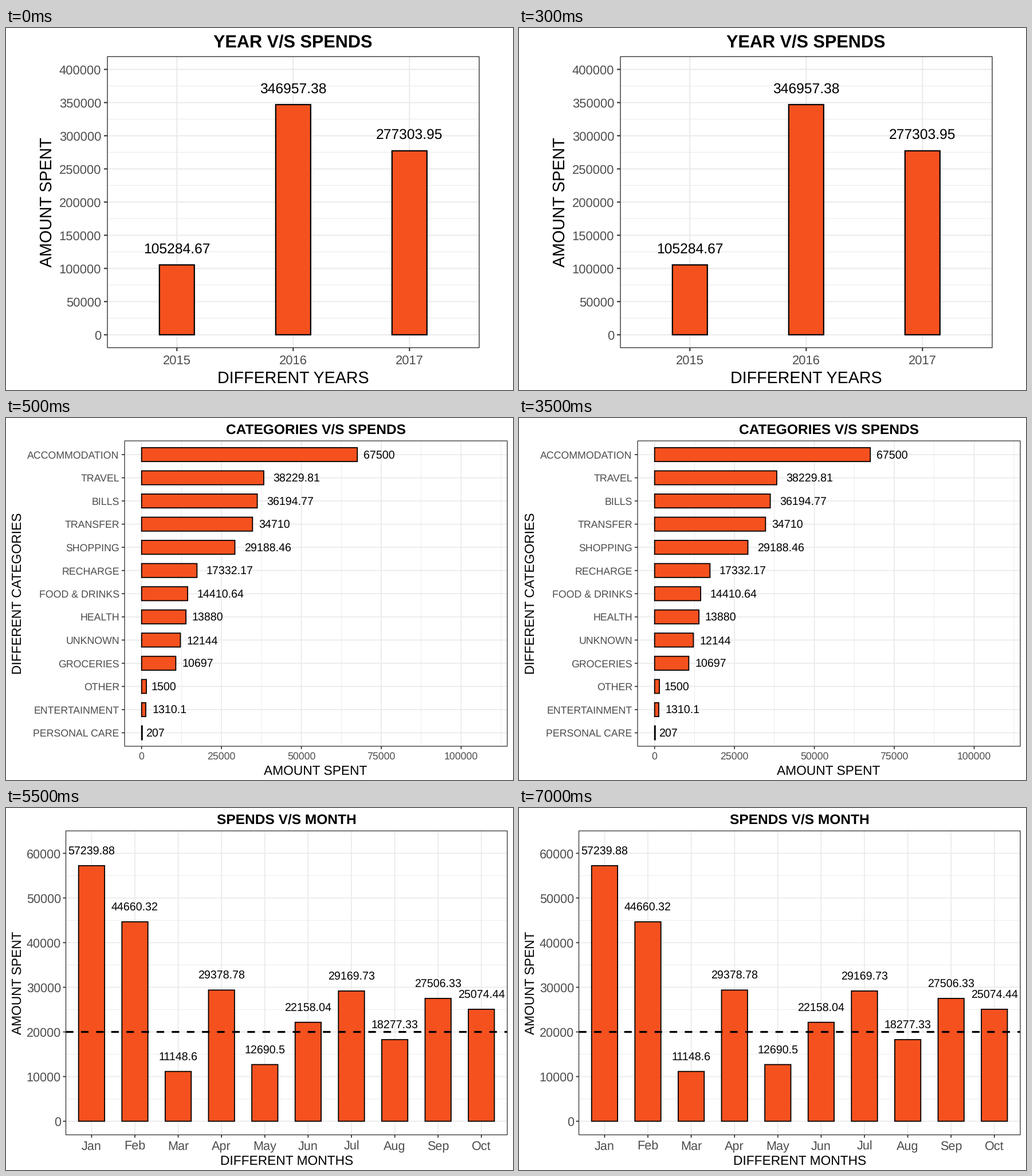
A matplotlib script for the animation above (8000 ms loop, 885 by 633 pixels).

```python
import matplotlib.pyplot as plt
from matplotlib.animation import FuncAnimation
from matplotlib.patches import Rectangle

plt.rcParams["font.family"] = "Liberation Sans"
plt.rcParams["text.hinting"] = "none"
plt.rcParams["path.snap"] = False

W, H, DPI = 885, 633, 100
PT = 72 / DPI
CAP = 0.344  # half the cap height, in ems
ORANGE, GRID, DARK, GREY = "#F5511E", "#EBEBEB", "#333333", "#4D4D4D"

fig = plt.figure(figsize=(W / DPI, H / DPI), dpi=DPI, facecolor="white")


def new_chart():
    ax = fig.add_axes([0, 0, 1, 1])
    ax.set_xlim(0, W)
    ax.set_ylim(H, 0)
    ax.axis("off")
    return ax


def text(ax, x, y, s, size, color="black", ha="center", rot=0, weight="normal"):
    """Place text with its capitals centred on the given point."""
    dx, dy = (CAP * size, 0) if rot else (0, CAP * size)
    ax.text(x + dx, y + dy, s, fontsize=size * PT, color=color, ha=ha,
            va="baseline", rotation=rot, rotation_mode="anchor",
            weight=weight, zorder=6)


def line(ax, x0, y0, x1, y1, color, width, z=1, **kw):
    ax.plot([x0, x1], [y0, y1], color=color, lw=width * PT, zorder=z,
            solid_capstyle="butt", dash_capstyle="butt", **kw)


def grid(ax, panel, xs=(), ys=(), width=2.0):
    left, top, right, bottom = panel
    for x in xs:
        line(ax, x, top, x, bottom, GRID, width)
    for y in ys:
        line(ax, left, y, right, y, GRID, width)


def bar(ax, x0, y0, x1, y1, width):
    ax.add_patch(Rectangle((x0, y0), x1 - x0, y1 - y0, fc=ORANGE, ec="black",
                           lw=width * PT, zorder=3))


def frame(ax, panel, width):
    left, top, right, bottom = panel
    ax.add_patch(Rectangle((left, top), right - left, bottom - top,
                           fill=False, ec=DARK, lw=width * PT, zorder=5))


def ticks(ax, panel, xs, ys, length, width):
    left, _, _, bottom = panel
    for x in xs:
        line(ax, x, bottom, x, bottom + length, DARK, width, 4)
    for y in ys:
        line(ax, left - length, y, left, y, DARK, width, 4)


def number_width(s, size):
    dots = s.count(".")
    return size * (0.556 * (len(s) - dots) + 0.278 * dots)


def column_chart(panel, names, values, first, step, bar_w, zero, scale,
                 major, top_value, nudge, label_size, tick_len, weights):
    grid_w, bar_lw, frame_w = weights
    ax = new_chart()
    xs = [first + step * i for i in range(len(names))]
    marks = range(0, top_value + 1, major)
    ys = [zero - v * scale for v in marks]
    half = major * scale / 2
    grid(ax, panel, ys=[y - half for y in ys if y - half > panel[1] + 2],
         width=grid_w / 2)
    grid(ax, panel, xs, ys, grid_w)
    for x, v in zip(xs, values):
        y = zero - v * scale
        bar(ax, x - bar_w / 2, y, x + bar_w / 2, zero, bar_lw)
        text(ax, x, y - nudge, str(v), label_size)
    frame(ax, panel, frame_w)
    ticks(ax, panel, xs, ys, tick_len, grid_w)
    return ax, xs, list(zip(marks, ys))


def years_chart():
    panel = (177, 50, 826, 559)
    names = ["2015", "2016", "2017"]
    ax, xs, marks = column_chart(
        panel, names, [105284.67, 346957.38, 277303.95], 298.3, 203, 61,
        536.4, 0.00116, 50000, 400000, 29, 24.6, 6, (2.1, 2.2, 1.4))
    for x, s in zip(xs, names):
        text(ax, x, 580, s, 22, GREY)
    for v, y in marks:
        text(ax, 166.2, y + 0.8, str(v), 22, GREY, "right")
    text(ax, 500.7, 24, "YEAR V/S SPENDS", 30.7, weight="bold")
    text(ax, 501.2, 611, "DIFFERENT YEARS", 28.6)
    text(ax, 70.3, 305, "AMOUNT SPENT", 28.6, rot=90)
    return ax


def categories_chart():
    ax = new_chart()
    panel = (207, 40, 875, 574)
    zero, scale = 236.7, 139.45 / 25000
    rows = [
        ("ACCOMMODATION", "67500"), ("TRAVEL", "38229.81"),
        ("BILLS", "36194.77"), ("TRANSFER", "34710"),
        ("SHOPPING", "29188.46"), ("RECHARGE", "17332.17"),
        ("FOOD & DRINKS", "14410.64"), ("HEALTH", "13880"),
        ("UNKNOWN", "12144"), ("GROCERIES", "10697"), ("OTHER", "1500"),
        ("ENTERTAINMENT", "1310.1"), ("PERSONAL CARE", "207"),
    ]
    ys = [64 + 40.54 * i for i in range(len(rows))]
    marks = range(0, 100001, 25000)
    xs = [zero + v * scale for v in marks]
    grid(ax, panel, xs=[x + 12500 * scale for x in xs], width=0.9)
    grid(ax, panel, xs, ys, 1.8)
    for y, (name, amount) in zip(ys, rows):
        end = zero + float(amount) * scale
        bar(ax, zero, y - 12.15, end, y + 12.15, 1.8)
        text(ax, end + 0.7 * number_width(amount, 19.6), y + 0.6, amount, 19.6)
        text(ax, 197.8, y + 0.6, name, 17.7, GREY, "right")
    frame(ax, panel, 1.3)
    ticks(ax, panel, xs, ys, 5, 1.7)
    for v, x in zip(marks, xs):
        text(ax, x, 590.5, str(v), 17.7, GREY)
    text(ax, 541, 19, "CATEGORIES V/S SPENDS", 24.5, weight="bold")
    text(ax, 540.5, 615.5, "AMOUNT SPENT", 22.8)
    text(ax, 18.9, 307, "DIFFERENT CATEGORIES", 22.9, rot=90)
    return ax


def months_chart():
    panel = (104.5, 40, 875, 571.5)
    names = "Jan Feb Mar Apr May Jun Jul Aug Sep Oct".split()
    values = [57239.88, 44660.32, 11148.6, 29378.78, 12690.5,
              22158.04, 29169.73, 18277.33, 27506.33, 25074.44]
    ax, xs, marks = column_chart(
        panel, names, values, 149.4, 75.6, 45.4, 547.7, 0.007807,
        10000, 60000, 26, 19.6, 5, (1.8, 1.8, 1.3))
    y = marks[2][1]
    line(ax, panel[0], y, panel[2], y, "black", 3.3, 4, dashes=(4, 4))
    for x, s in zip(xs, names):
        text(ax, x, 590, s, 21.6, GREY)
    for v, y in marks:
        text(ax, 96, y + 0.7, str(v), 21.6, GREY, "right")
    text(ax, 489.5, 19, "SPENDS V/S MONTH", 24.5, weight="bold")
    text(ax, 490, 615.5, "DIFFERENT MONTHS", 22.8)
    text(ax, 18.9, 306, "AMOUNT SPENT", 22.8, rot=90)
    return ax


STEP = 500
charts = [years_chart(), categories_chart(), months_chart()]
starts = [0, 500, 5500]


def update(i):
    current = sum(i * STEP >= s for s in starts) - 1
    for k, ax in enumerate(charts):
        ax.set_visible(k == current)
    return charts


anim = FuncAnimation(fig, update, frames=16, interval=STEP,
                     init_func=lambda: update(0), repeat=True,
                     repeat_delay=0, blit=False)
plt.show()
```
